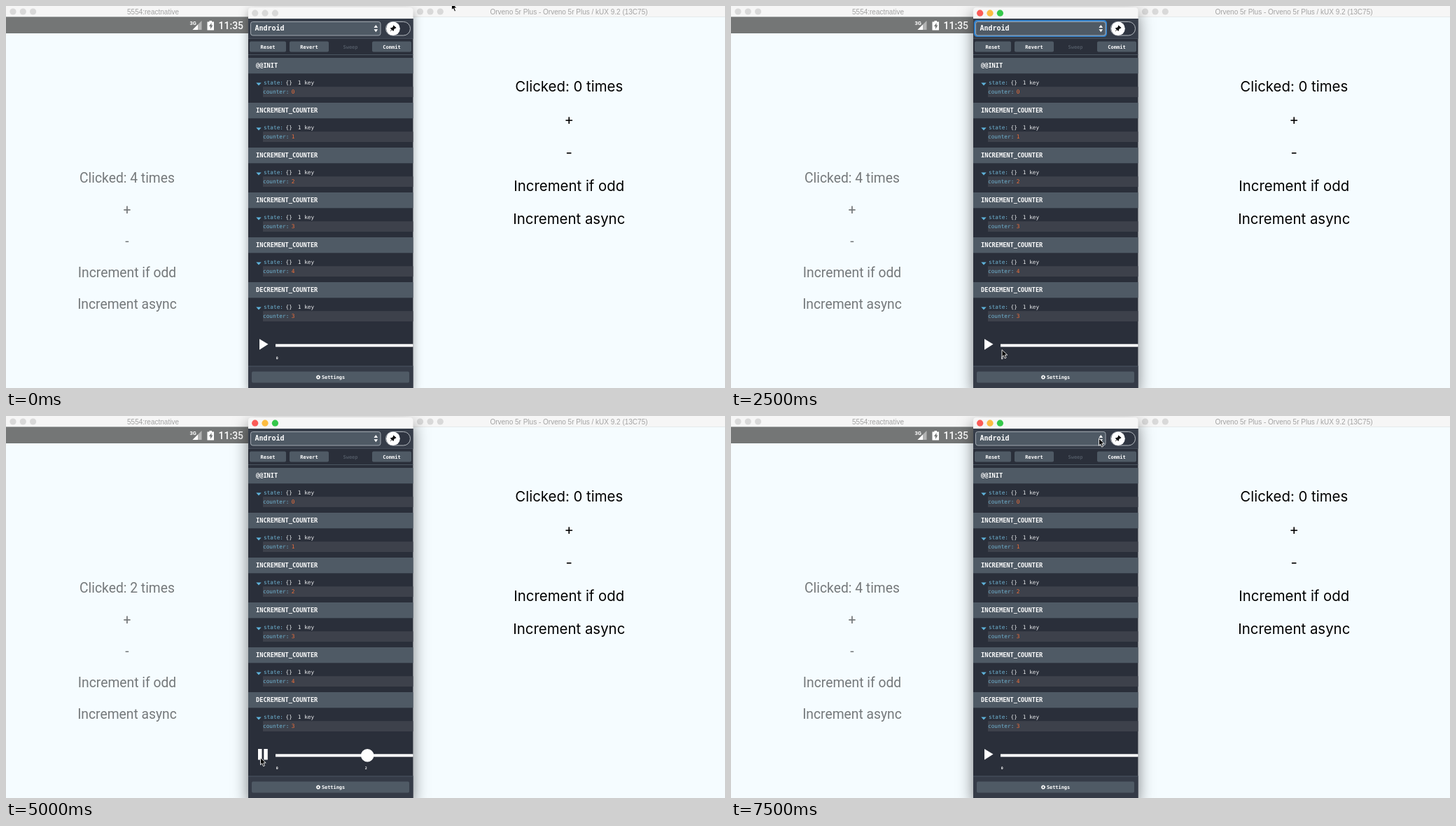
Recreate the animation shown at these times as an HTML page. Size 1027 by 545 pixels, loop 8 s.

```html
<!DOCTYPE html>
<html lang="en">
<head>
<meta charset="utf-8">
<title>Remote devtools</title>
<style>
html, body { margin: 0; width: 100%; height: 100%; overflow: hidden; background: #f5fcff; }
svg { display: block; }
text { white-space: pre; }
.title { font: 10px "Liberation Sans", sans-serif; fill: #a3a3a3; text-anchor: middle; }
.droid { font: 19.3px Roboto, sans-serif; fill: #75797b; text-anchor: middle; }
.phone { font: 20.4px Inter, sans-serif; fill: #000; text-anchor: middle; }
.mono { font-family: "DejaVu Sans Mono", monospace; fill: #fff; }
.bold { font-weight: bold; }
.mid { text-anchor: middle; }
</style>
</head>
<body>
<svg id="stage" width="1027" height="545" viewBox="0 0 1027 545">
  <defs><clipPath id="panel"><rect x="346" y="18" width="235.5" height="527"/></clipPath></defs>
  <rect width="1027" height="545" fill="#f5fcff"/>
  <rect width="1027" height="15.5" fill="#f6f6f6"/>
  <rect y="15" width="1027" height=".6" fill="#dcdfe0"/>
  <g id="sideLights" fill="#d9d9d9"></g>
  <text class="title" x="210" y="11.5">5554:reactnative</text>
  <text class="title" x="804" y="11.5">Orveno 5r Plus - Orveno 5r Plus / kUX 9.2 (13C75)</text>

  <rect y="15.5" width="346" height="23.5" fill="#747676"/>
  <g fill="#fff">
    <text x="262.5" y="26.5" font-family="Roboto, sans-serif" font-size="7.5" font-weight="bold">3G</text>
    <path d="M279.5 21V34H266.5Z" fill-opacity=".45"/>
    <path d="M274 26.500V34H266.500Z"/>
    <path d="M290.500 21h3.500v1.500h3v12h-9.500v-12h3z"/>
    <path d="M293.500 24l-3.500 5h2v4l3.500-5.500h-2z" fill="#747676"/>
    <text x="303.500" y="32.800" font-family="Roboto, sans-serif" font-size="14" font-weight="500">11:35</text>
  </g>
  <g id="apps"></g>

  <path id="shadow" d="M346 545V7q0-5 5-5h225.500q5 0 5 5V545z" fill="#f6f6f6"/>
  <g id="lights"></g>
  <g id="tools" clip-path="url(#panel)">
    <rect x="346" y="18" width="236" height="527" fill="#2a2f3a"/>
    <rect x="346" y="18" width="236" height="28" fill="#363d49"/>
    <rect x="346" y="46" width="236" height="1" fill="#454d59"/>
    <rect x="346" y="69" width="236" height="1" fill="#4b5561"/>
    <rect id="ring" x="348.500" y="21.500" width="187" height="21" rx="3" fill="none" stroke="#3182ce" stroke-width="3"/>
    <rect id="select" x="349.500" y="22.500" width="185.500" height="19.500" rx="3" fill="#4f5a65" stroke="#a1a8b0"/>
    <path d="M525.500 31l2.800-4 2.800 4zM525.500 33.200l2.800 4 2.800-4z" fill="#fff"/>
    <rect x="542.500" y="22.500" width="35" height="19.500" rx="9.750" fill="#2f3541" stroke="#b5bac0"/>
    <circle cx="553" cy="32.200" r="9.800" fill="#fff"/>
    <path d="M553.500 27.500l4 3.500-1 1-1 0-1.500 1.800 0 1.500-1 .5-1.800-1.700-2 2.200-.4-.4 1.800-2.400-1.600-1.600.6-1 1.700 0 1.700-1.700 0-1z" fill="#111"/>
    <path id="play" d="M362 475L374.500 482.500 362 490.500z" fill="#fff"/>
    <path id="pause" d="M360 475h5.500v15.500h-5.500zM368.300 475h5.500v15.500h-5.500z" fill="#fff"/>
    <rect x="385" y="482.300" width="200" height="4" fill="#fff"/>
    <circle id="thumb" cy="484.300" r="9.200" fill="#fff"/>
    <rect x="346" y="513.500" width="236" height="32" fill="#353b47"/>
    <rect x="346" y="513.500" width="236" height="1" fill="#4b5561"/>
    <rect x="351" y="521.500" width="225" height="16" rx="2" fill="#4f5a65"/>
    <circle cx="446" cy="529.600" r="1.900" fill="none" stroke="#fff" stroke-width="1.400"/>
    <circle cx="446" cy="529.600" r="2.700" fill="none" stroke="#fff" stroke-width="1" stroke-dasharray="1.060"/>
  </g>
  <path id="cursor" d="M.5 .5V10.700L2.800 8.600 4.600 12.700 6.500 11.900 4.800 7.900H8.200Z" fill="#000" stroke="#fff" stroke-width=".9"/>
</svg>
<script>
const $ = id => document.getElementById(id);

function add(parent, tag, attrs, content = '') {
  const el = document.createElementNS('http://www.w3.org/2000/svg', tag);
  for (const key in attrs) el.setAttribute(key, attrs[key]);
  el.textContent = content;
  return $(parent).appendChild(el);
}
const mono = (x, y, size, content, fill = '#fff', cls = '') =>
  add('tools', 'text', { x, y, 'font-size': size, class: 'mono ' + cls, fill, style: `fill:${fill}` }, content);

for (const x of [10, 24.3, 38.6, 591.5, 606, 620.3]) add('sideLights', 'circle', { cx: x, cy: 8, r: 4.6 });
const lights = [355.7, 370, 384.4].map(cx => add('lights', 'circle', { cx, cy: 10.2, r: 4.6 }));

// Both counter apps share the same rows.
function app(cls, x, y, step) {
  return ['Clicked: 0 times', '+', '-', 'Increment if odd', 'Increment async']
    .map((row, i) => add('apps', 'text', { class: cls, x, y: y + i * step }, row))[0];
}
const clicked = app('droid', 173, 251.8, 45.1);
app('phone', 804.3, 121.5, 47.4);

mono(355.500, 35.2, 10, 'Android', '#fff', 'bold');
[['Reset', 348, 52], ['Revert', 405, 56], ['Sweep', 464, 56], ['Commit', 523, 56]].forEach(([label, x, width]) => {
  const off = label === 'Sweep';
  if (!off) add('tools', 'rect', { x, y: 50.5, width, height: 15, rx: 2, fill: '#4f5a65' });
  mono(x + width / 2, 60.5, 7, label, off ? '#505863' : '#fff', 'bold mid');
});

[0, 1, 2, 3, 4, 3].forEach((value, i) => {
  const y = 74 + i * 64;
  const name = i === 0 ? '@@INIT' : (i < 5 ? 'INCREMENT' : 'DECREMENT') + '_COUNTER';
  add('tools', 'rect', { x: 346, y, width: 236, height: 22.3, fill: '#4f5a65' });
  mono(357, y + 14.2, 8.65, name, '#fff', 'bold');
  add('tools', 'path', { d: `M357.300 ${y + 35.5}h7.400l-3.700 4z`, fill: '#5fb4dc' });
  add('tools', 'rect', { x: 367, y: y + 41.2, width: 215, height: 14.8, fill: '#3d414b' });
  mono(368, y + 38, 7.75, 'state:', '#6fb3d2');
  mono(399.5, y + 38, 7.75, '{}', '#e8eaec');
  mono(416.800, y + 38, 7.75, '1 key', '#e8eaec');
  mono(367, y + 51, 7.75, 'counter:', '#6fb3d2');
  mono(407.700, y + 51, 7.75, value, '#f0703a');
});
mono(387.2, 504, 5, '0', '#fff', 'bold mid');
const mark = mono(0, 504, 5, '', '#fff', 'bold mid');
mono(467.5, 532.2, 6.9, 'Settings', '#fff', 'bold mid');

// Each track lists [start ms, value...]; the values hold until the next entry.
const pointer = [
  [0, 636, -5], [250, 620, 16], [500, 491, 279], [750, 490, 291], [1000, 441, 384], [1250, 394, 455],
  [1500, 375, 465], [1750, 386.5, 490], [3250, 386.5, 489.5], [4000, 367, 487], [4250, 363, 487],
  [6000, 596, 327], [6250, 588, 271], [6500, 518, 95], [6750, 513, 56], [7000, 509, 42],
  [7250, 521, 32], [7500, 525, 31.5]
];
const counts = [[0, 4], [3750, 0], [4500, 1], [5000, 2], [5500, 3], [6000, 4], [6500, 3], [7000, 4]];
const slides = [[0, 9], [3500, 0], [4500, 1], [5000, 2], [5500, 3], [6000, 4]];
const at = (track, t) => track.findLast(entry => entry[0] <= t).slice(1);
const show = (id, on) => $(id).style.display = on ? '' : 'none';

function draw(now) {
  const t = now % 8000;
  const active = t >= 2500, playing = t >= 4500 && t < 7000;
  const [x, y] = at(pointer, t), [slide] = at(slides, t);
  $('cursor').setAttribute('transform', `translate(${x} ${y})`);
  clicked.textContent = `Clicked: ${at(counts, t)} times`;
  $('thumb').setAttribute('cx', 389.2 + slide * 63.5);
  mark.textContent = slide || '';
  mark.setAttribute('x', 387.2 + slide * 63.5);
  show('play', !playing);
  show('pause', playing);
  show('ring', active && t < 3500);
  ['#fc5b57', '#fdbc40', '#34c84a'].forEach((color, i) => lights[i].setAttribute('fill', active ? color : '#d9d9d9'));
  $('shadow').style.filter = active
    ? 'drop-shadow(0 9px 11px rgba(0,0,0,.5))'
    : 'drop-shadow(0 5px 7px rgba(0,0,0,.35))';
  requestAnimationFrame(draw);
}
requestAnimationFrame(draw);
</script>
</body>
</html>
```
